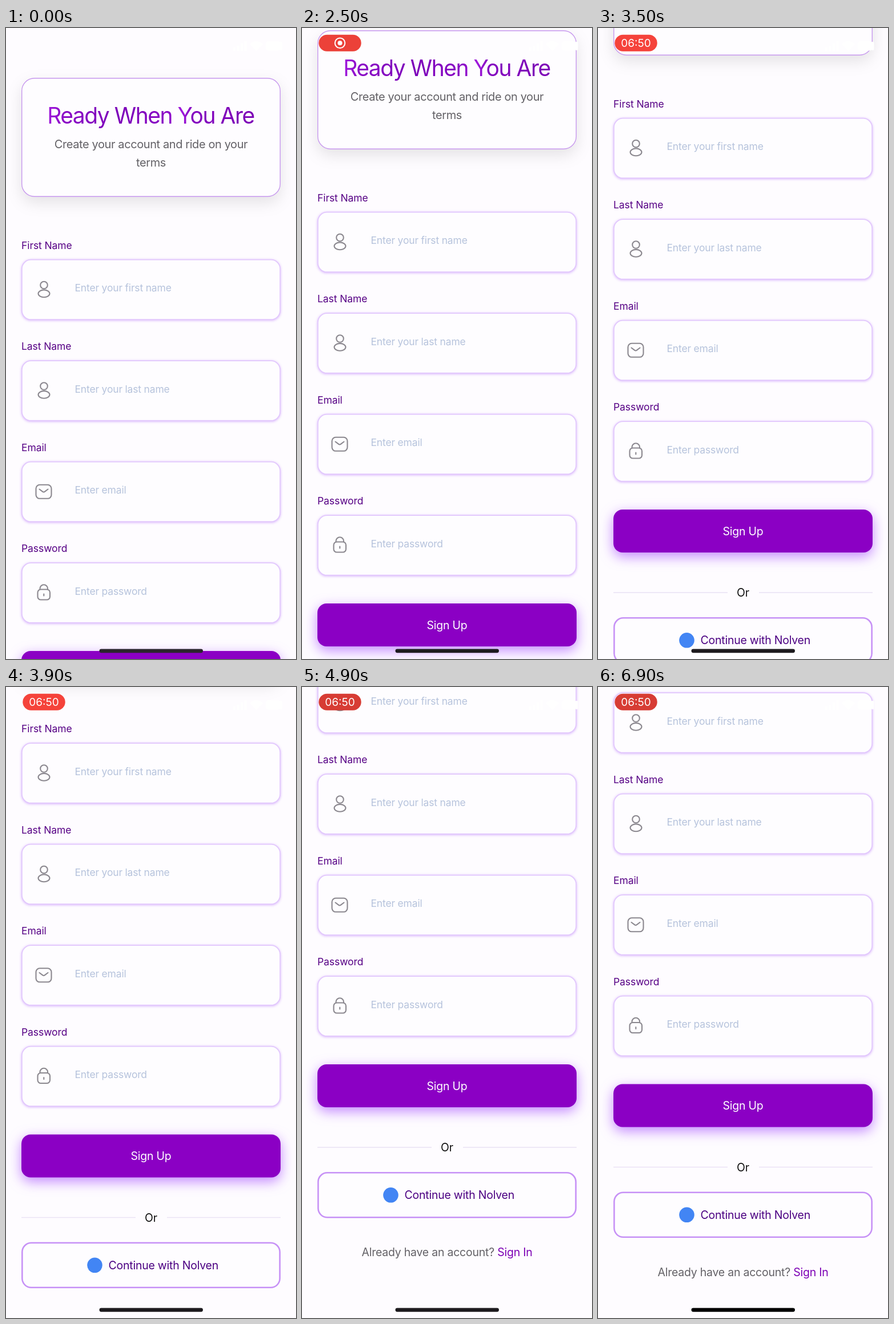
Recreate the animation shown at these times as an HTML page. Size 508 by 1102 pixels, loop 7000 ms.

```html
<!DOCTYPE html>
<html lang="en">
<head>
<meta charset="utf-8">
<title>Sign up</title>
<style>
  html, body { margin: 0; width: 100%; height: 100%; overflow: hidden; background: #fefcff; }
  svg { display: block; width: 100%; height: 100%; }
  text { font-family: Inter, Roboto, sans-serif; font-optical-sizing: none; font-size: 19.5px; letter-spacing: -.012em; }
  .mid { text-anchor: middle; }
  .title { font-size: 39px; letter-spacing: -.038em; fill: url(#titleFill); }
  .sub { font-size: 20px; letter-spacing: -.02em; fill: #636166; }
  .label { font-size: 17.5px; letter-spacing: -.005em; fill: #560085; }
  .hint { font-size: 17.5px; letter-spacing: -.01em; fill: #b6c3dc; }
  .card { fill: #fefdff; stroke: #c798ee; stroke-width: 1.4; filter: drop-shadow(0 10px 13px rgba(0, 0, 0, .1)); }
  .field { fill: #fefdff; stroke: #e2c8fd; stroke-width: 1.8; filter: drop-shadow(0 1.5px 2px rgba(168, 85, 247, .42)); }
  .button { fill: #8b00c4; filter: drop-shadow(0 7px 11px rgba(152, 50, 255, .58)); }
  .outline { fill: #fefdff; stroke: #c792f6; stroke-width: 2.6; }
  .icon { fill: none; stroke: #8b888f; stroke-width: 2.1; stroke-linecap: round; stroke-linejoin: round; }
  .rule { stroke: #e9e2f5; stroke-width: 1.6; }
</style>
</head>
<body>
<svg viewBox="0 0 508 1102" preserveAspectRatio="none">
  <defs>
    <linearGradient id="titleFill" gradientUnits="userSpaceOnUse" x1="73" y1="0" x2="434" y2="0">
      <stop offset="0" stop-color="#a01adc"/>
      <stop offset=".08" stop-color="#8a06c6"/>
      <stop offset=".35" stop-color="#7c00b9"/>
      <stop offset=".58" stop-color="#8a06c6"/>
      <stop offset=".65" stop-color="#a01adc"/>
      <stop offset=".7" stop-color="#8404c0"/>
      <stop offset="1" stop-color="#7c00b6"/>
    </linearGradient>
    <g id="person" class="icon">
      <circle cx="66.5" cy="45" r="6.3"/>
      <ellipse cx="66.5" cy="59.8" rx="10" ry="6.4"/>
    </g>
    <g id="mail" class="icon">
      <rect x="52.5" y="40.8" width="27" height="24" rx="6.5"/>
      <path d="M58.5 48.5 L64 52.7 Q66 54.2 68 52.7 L73.5 48.5"/>
    </g>
    <g id="lock" class="icon">
      <rect x="55.5" y="47" width="21.5" height="18" rx="5.5"/>
      <path d="M59.5 47 V45.5 A6.7 6.7 0 0 1 73 45.5 V47 M66.3 55 V58"/>
    </g>
  </defs>

  <g id="page">
    <rect class="card" x="27.7" y="87.7" width="452.6" height="206.6" rx="22"/>
    <text class="title mid" x="253.5" y="167">Ready When You Are</text>
    <text class="sub mid" x="254" y="210.3">Create your account and ride on your</text>
    <text class="sub mid" x="254" y="241.6">terms</text>

    <g id="fields"></g>

    <rect class="button" x="27" y="1088" width="454" height="75" rx="16"/>
    <text class="mid" x="254" y="1132.5" fill="#fff">Sign Up</text>

    <path class="rule" d="M27 1233 H227 M282 1233 H481"/>
    <text class="mid" x="254" y="1240" fill="#111">Or</text>

    <rect class="outline" x="28.3" y="1277.3" width="451.4" height="78" rx="16"/>
    <circle cx="155.5" cy="1316.3" r="13.3" fill="#4285f4"/>
    <text x="179.5" y="1323.3" fill="#4b0082">Continue with Nolven</text>

    <text class="mid" x="254" y="1423" fill="#636166">Already have an account? <tspan fill="#7c00b4">Sign In</tspan></text>
  </g>

  <g fill="#fff">
    <path d="M398 34 h4 v6 h-4z M404.5 31 h4 v9 h-4z M411 27 h4 v13 h-4z M417.5 23 h4 v17 h-4z"/>
    <path d="M427 28 Q438.5 18 450 28 L438.5 40z"/>
    <rect x="455" y="23" width="26" height="16.5" rx="5"/>
    <rect x="479" y="24" width="4.5" height="15" rx="2"/>
  </g>

  <g id="pill">
    <rect id="pillFill" x="29.3" y="11.8" width="74.4" height="29" rx="14.5"/>
    <g id="record">
      <circle cx="66.5" cy="26.3" r="8.8" fill="none" stroke="#fff" stroke-width="2"/>
      <circle cx="66.5" cy="26.3" r="4" fill="#fff"/>
    </g>
    <text id="clock" class="mid" x="66.5" y="33" fill="#fff" style="font-size:19px;letter-spacing:0">06:50</text>
  </g>
  <rect id="homeBar" x="163.5" y="1084.4" width="181.5" height="6.8" rx="3.4"/>
</svg>

<script>
const LOOP = 7000, STEP = 100;
const REST = 394.5, PULLED = 429, RELEASE = 4900;
const $ = id => document.getElementById(id);

const fields = [
  ["First Name", "Enter your first name", "person"],
  ["Last Name", "Enter your last name", "person"],
  ["Email", "Enter email", "mail"],
  ["Password", "Enter password", "lock"]
];
$("fields").innerHTML = fields.map(([label, hint, icon], i) => `
  <g transform="translate(0 ${404 + i * 176.5})">
    <text class="label" x="27" y="-18.2">${label}</text>
    <rect class="field" x="27.8" y=".6" width="452.4" height="104.6" rx="16"/>
    <use href="#${icon}"/>
    <text class="hint" x="120.5" y="56.3">${hint}</text>
  </g>`).join("");

const clamp = x => Math.min(1, Math.max(0, x));
const ramp = (t, from, to) => clamp((t - from) / (to - from));
const mix = (a, b, k) => `rgb(${a.map((v, i) => Math.round(v + (b[i] - v) * k))})`;

// Finger drag, rubber band past the end, then a critically damped return.
const drag = [[2000, 0], [2500, 83], [3500, 247], [4300, 366], [4480, REST - 2], [RELEASE, PULLED]];
function scrollAt(t) {
  if (t <= drag[0][0]) return 0;
  if (t >= RELEASE) {
    const s = (t - RELEASE) / 100;
    return REST + (PULLED - REST) * (1 + s) * Math.exp(-s);
  }
  const i = drag.findIndex(([time]) => time > t);
  const [t0, y0] = drag[i - 1], [t1, y1] = drag[i];
  return y0 + (y1 - y0) * ramp(t, t0, t1);
}

function draw(t) {
  $("page").setAttribute("transform", `translate(0 ${-scrollAt(t).toFixed(2)})`);

  const dim = Math.max(0, Math.cos((t - 900) / 1000 * Math.PI));
  $("pillFill").setAttribute("fill", mix([245, 67, 59], [215, 60, 52], dim));
  $("pill").setAttribute("opacity", t < 400 ? 0 : ramp(t, 300, 500));

  const showClock = ramp(t, 2700, 3000);
  $("record").setAttribute("opacity", 1 - showClock);
  $("clock").setAttribute("opacity", showClock);

  const shade = 42 - 13 * ramp(t, 2000, 2500) - 29 * ramp(t, 5000, 5900);
  $("homeBar").setAttribute("fill", mix([0, 0, 0], [42, 37, 44], shade / 42));
}

const start = performance.now();
function tick() {
  const t = (performance.now() - start) % LOOP;
  draw(Math.floor(t / STEP) * STEP);
  requestAnimationFrame(tick);
}
tick();
</script>
</body>
</html>
```
